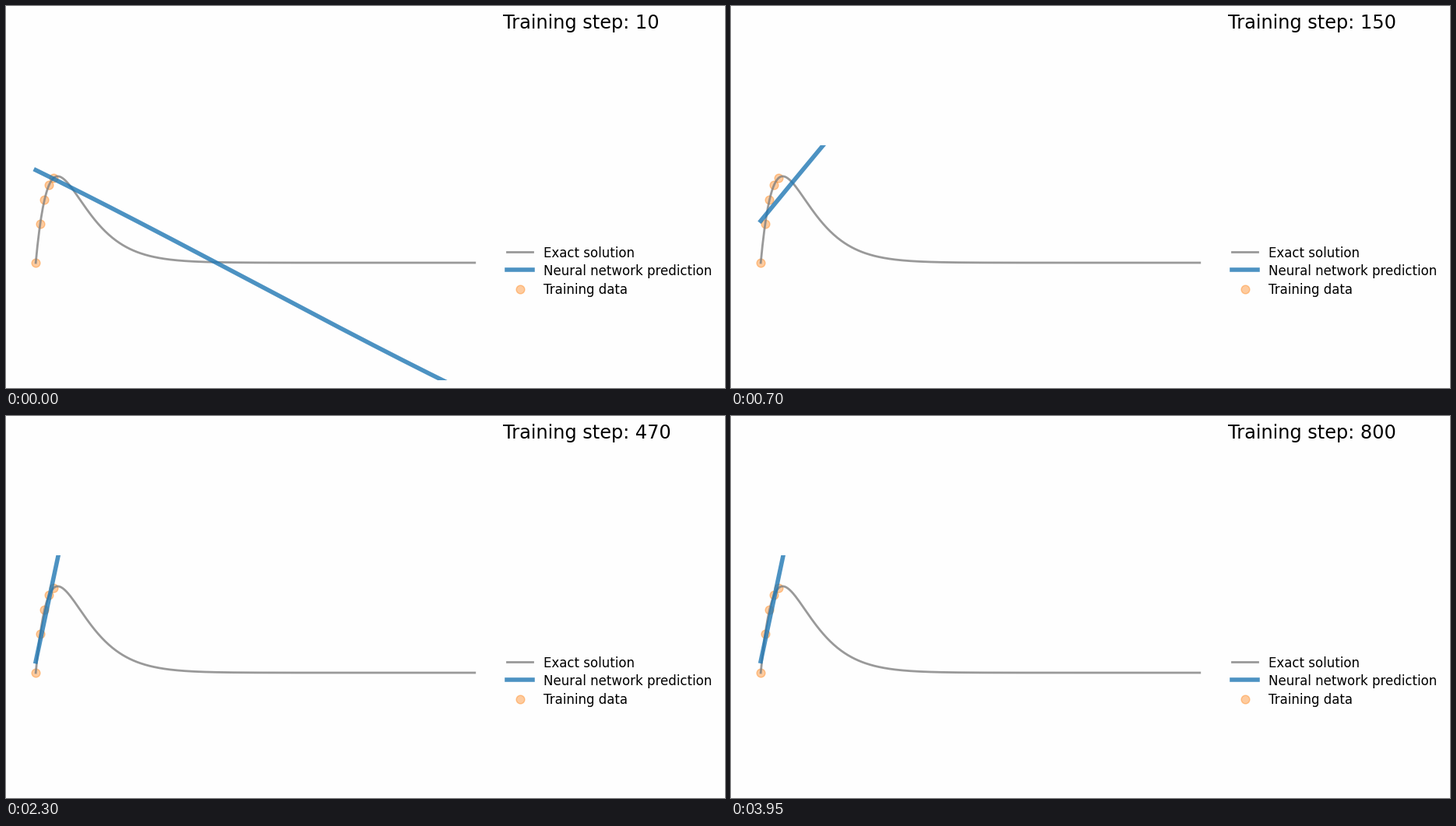
A matplotlib script that plays this animation: 923x491 px, repeating every 4 s.

```python
import numpy as np
import matplotlib.pyplot as plt
from matplotlib.animation import FuncAnimation

W, H, DPI = 923, 491, 100
FRAMES, INTERVAL = 80, 50
HALF = 151          # half the plot height; one y unit is one pixel
MEAN = 67.6         # average height of the training points
FIT_SLOPE = 2660    # slope of the straight line the network settles on

GREY = dict(color="grey", linewidth=2, alpha=0.8)
BLUE = dict(color="tab:blue", linewidth=4, alpha=0.8)
DOTS = dict(color="tab:orange", s=60, alpha=0.4)


def ringing(s, start, size, decay, period):
    """Damped oscillation that begins at a given step."""
    d = s - start
    return size * np.exp(-d / decay) * np.cos(2 * np.pi * d / period) if d >= 0 else 0.0


def exact(x):
    return 111.1 * 20 * x * np.exp(1 - 20 * x)


def predict(x, s):
    """Network output after s steps: an early tilt fades, then the slope grows to the fit."""
    early = np.exp(-(s - 10) / 12)
    slope = FIT_SLOPE / (1 + np.exp((176.4 - s) / 25.1)) - 279.5 * early
    level = MEAN - 0.02 * slope + ringing(s, 10, 46, 12, 30) + ringing(s, 740, -11, 18, 40)
    return level + slope * x - (38 + 8 * early) * x**2 + (4.5 + 27 * early) * x**3


def pixel_axes(left, bottom, width, height):
    ax = fig.add_axes([left / W, bottom / H, width / W, height / H])
    ax.axis("off")
    return ax


plt.rcParams["font.family"] = "DejaVu Sans"
fig = plt.figure(figsize=(W / DPI, H / DPI), dpi=DPI, facecolor="#fefefe")

plot = pixel_axes(10, 10, 620, 2 * HALF)
plot.set(xlim=(-0.05, 1.05), ylim=(-HALF, HALF))
x = np.linspace(0, 1, 500)
x_data = x[:25:5]
plot.plot(x, exact(x), **GREY)
line, = plot.plot(x, predict(x, 10), **BLUE)
plot.scatter(x_data, exact(x_data), **DOTS)

# Title and legend, placed in pixels from the top left
stage = pixel_axes(0, 0, W, H)
stage.set(xlim=(0, W), ylim=(H, 0))
title = stage.text(638.45, 29, "", fontsize=17.28)

rows = 323 + 23.3 * np.arange(3)
for y, label in zip(rows, ("Exact solution", "Neural network prediction", "Training data")):
    stage.text(689.53, y, label, fontsize=12)
for y, style in zip(rows, (GREY, BLUE)):
    stage.plot([642.87, 676.2], [y - 6.85] * 2, **style)
stage.scatter(659.5, rows[2] - 5.4, **DOTS)


def update(i):
    step = 10 * (i + 1)
    line.set_ydata(predict(x, step))
    title.set_text(f"Training step: {step}")
    return line, title


anim = FuncAnimation(fig, update, frames=FRAMES, interval=INTERVAL, repeat=True, repeat_delay=0)
plt.show()
```
